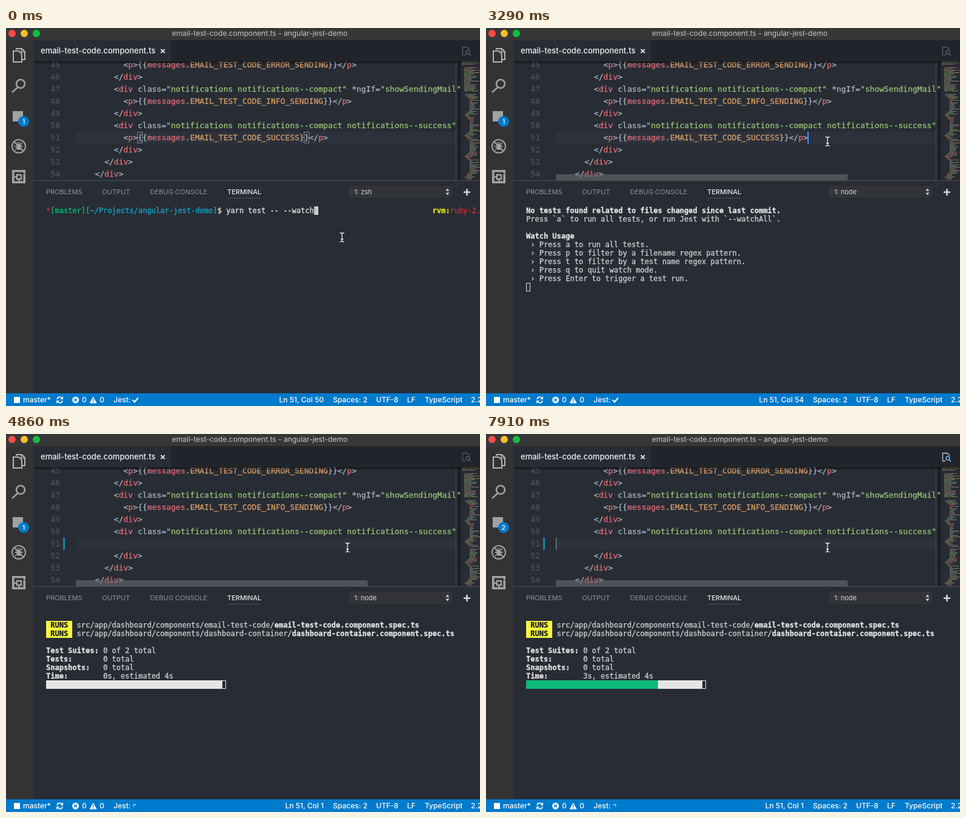
An HTML page with a canvas that plays this animation: 780x623 px, repeating every 7.99 s.

```html
<!DOCTYPE html>
<html>
<head>
<meta charset="utf-8">
<style>
html, body { margin: 0; width: 100%; height: 100%; overflow: hidden; background: #282c34; }
canvas { display: block; }
</style>
</head>
<body>
<canvas id="stage" width="780" height="623"></canvas>
<script>
const c = document.getElementById('stage').getContext('2d');
const LOOP = 7990;
const MONO = '"DejaVu Sans Mono", monospace', UI = 'Inter, Roboto, sans-serif';
const CODE_W = 13 * 0.60205, TERM_W = 12 * 0.60205;
const GREY = '#abb2bf', LIGHT = '#e5e5e5', BLUE = '#007acc';

const CODE = [
  [10, '<p>{{messages.EMAIL_TEST_CODE_ERROR_SENDING}}</p>'],
  [8, '</div>'],
  [8, '<div class="notifications notifications--compact" *ngIf="showSendingMail"'],
  [10, '<p>{{messages.EMAIL_TEST_CODE_INFO_SENDING}}</p>'],
  [8, '</div>'],
  [8, '<div class="notifications notifications--compact notifications--success"'],
  [10, '<p>{{messages.EMAIL_TEST_CODE_SUCCESS}}</p>'],
  [8, '</div>'],
  [6, '</div>'],
  [4, '</div>'],
];

// Moments of the story, in ms
const ENTER = 900, YARN = 1100, JEST = 1280, CLICK = 2150, SEARCH = 2330, USAGE = 2540,
  CUT = 3740, DIRTY = 3920, GUTTER = 4040, SAVE = 4220, RERUN = 4400, RUNS = 4660,
  STAGED = 5060, TICK = 5550;
const BLINKS = [CLICK, 2750, 3290, 4280, 5420, 5960, 6500, 7040, 7580];
const POINTER = [[0, 553, 345], [1280, 578, 314], [1370, 640, 240], [1450, 671, 194],
  [1540, 668, 168], [1630, 630, 171], [1710, 588, 181], [1800, 562, 187]];
// Braille dots as bits: left column 1, 2, 4, right column 8, 16, 32
const SPIN = [11, 25, 57, 56, 60, 52, 38, 39, 7, 15];

function rect(x, y, w, h, color) {
  c.fillStyle = color;
  c.fillRect(x, y, w, h);
}

function disc(x, y, r, color) {
  c.fillStyle = color;
  c.beginPath();
  c.arc(x, y, r, 0, 7);
  c.fill();
}

function path(d, color, width = 2) {
  c.strokeStyle = color;
  c.lineWidth = width;
  c.stroke(new Path2D(d));
}

function text(s, x, y, font, color, align = 'left') {
  c.font = font;
  c.textAlign = align;
  c.fillStyle = color;
  c.fillText(s, x, y);
}

// Monospaced text with a slightly heavier stem
function mono(s, x, y, font, color, align) {
  text(s, x, y, `${font} ${MONO}`, color, align);
  c.strokeStyle = color;
  c.lineWidth = 0.3;
  c.strokeText(s, x, y);
}

const ui = (s, x, y, size, color, align, weight = 400) =>
  text(s, x, y, `${weight} ${size}px ${UI}`, color, align);

const noise = n => {
  const v = Math.sin(n * 127.1 + 11.7) * 43758.5453;
  return v - Math.floor(v);
};

function badge(x, y, n) {
  disc(x, y, 9, BLUE);
  ui(n, x, y + 4, 11, '#fff', 'center', 500);
}

function titleBar(t) {
  rect(0, 0, 780, 20, '#373737');
  ['#fc4a47', '#fdbc2d', '#14bf3f'].forEach((color, i) => disc(10 + 20 * i, 9, 6, color));
  if (t >= DIRTY && t < SAVE) disc(10, 9, 2, '#7a0c08');
  ui('email-test-code.component.ts - angular-jest-demo', 417.5, 13, 12, '#c8c8c8', 'center');
}

function activityBar(t) {
  const icon = '#a2a2a2';
  rect(0, 20, 46, 582, '#333333');
  path('M17 36V34H26L31 39V52H27 M12 38H21L26 43V56H12Z', '#b4b4b4');
  path('M25.5 34V39.5H31', '#b4b4b4', 1.5);
  path('M31 92a7 7 0 1 1 -14 0a7 7 0 1 1 14 0 M19 98L10 106', icon, 2.6);
  rect(11, 137, 17, 17, icon);
  path('M32 195a11 11 0 1 1 -22 0a11 11 0 1 1 22 0 M13 187L29 203', icon, 2);
  path('M14 195H28 M15 201L18 198 M27 189L24 192 M18 188L20 190 M24 188L22 190 M16 190L18 192 M26 201L24 199', icon, 1.4);
  c.fillStyle = icon;
  c.beginPath();
  c.ellipse(21, 195.5, 3.8, 5.5, 0, 0, 7);
  c.fill();
  path('M11.8 235.8H30.2V254.2H11.8Z', icon, 3.6);
  path('M18 242H25V249H18Z M21.5 249V253 M13 245.5H17', icon, 2.4);
  path('M27 238V243 M22 240H31', '#333333', 1.4);
  if (t >= DIRTY && t < SAVE) badge(29, 54, '1');
  badge(29, 154, t < STAGED ? '1' : '2');
}

function tabs(t) {
  rect(46, 20, 734, 35, '#21252b');
  rect(46, 20, 226, 35, '#282c34');
  ui('email-test-code.component.ts', 57, 42, 13, '#f2f2f2', 'left', 500);
  if (t >= CUT && t < SAVE) disc(258, 38, 4.5, '#d8d8d8');
  else path('M254.8 34.8L261.2 41.2 M261.2 34.8L254.8 41.2', '#e4e4e4', 1.9);
  const color = t < STAGED ? '#545b65' : '#c3ccd6';
  path('M756 44.5H751.5V31.5H759L762.5 35V36', color, 1.3);
  path('M763 40a3 3 0 1 1 -6 0a3 3 0 1 1 6 0 M762 42.3L765 45.5', t < STAGED ? '#466078' : '#75b8e8', 1.6);
}

function tokens([indent, line], y) {
  for (const m of line.matchAll(/"[^"]*"|[A-Z_]{3,}|messages|div|p(?=>)|./g)) {
    const s = m[0];
    const color = s[0] === '"' ? '#98c379' : /^[A-Z_]{3}/.test(s) ? '#d19a66'
      : /^(messages|div|p)$/.test(s) ? '#e06c75' : GREY;
    mono(s, 115 + (indent + m.index) * CODE_W, y, '13px', color);
  }
}

function minimap(t) {
  const palette = ['#c25a64', '#b98a5c', '#86ab6c', '#8b929e', '#86ab6c'];
  c.globalAlpha = 0.85;
  for (let row = 0; row < 98; row++) {
    const y = 55 + row * 2, head = row < 25, step = (row - 27) % 17;
    if ([3, 4, 25, 26].includes(row) || (t >= CUT && row === 66)) continue;
    let x = head ? (row < 5 ? 750 : 754) : 755 + Math.min(step, 17 - step, 4) * 2;
    const end = head ? 764 + noise(row + 50) * 20 : x + 4 + noise(row + 90) * 16;
    for (let k = 0; x < Math.min(end, 780); k++) {
      const w = 2 + noise(row * 9 + k) * 5;
      rect(x, y, Math.min(w, end - x), 1, palette[Math.floor(noise(row * 7 + k * 3) * 5)]);
      x += w + 0.6;
    }
  }
  c.globalAlpha = 1;
}

function caretOn(t) {
  return BLINKS.filter(b => b <= t).length % 2 === 1;
}

function editor(t) {
  rect(46, 55, 734, 196, '#282c34');
  rect(115, 171, 625, 20, '#2c313c');
  rect(740, 55, 1, 196, '#4a4f58');
  const edge = c.createLinearGradient(741, 0, 750, 0);
  edge.addColorStop(0, '#282c34');
  edge.addColorStop(0.55, '#181b20');
  edge.addColorStop(1, '#282c34');
  rect(741, 55, 9, 196, edge);

  c.save();
  c.beginPath();
  c.rect(46, 55, 701, 196);
  c.clip();
  CODE.forEach((line, i) => {
    const y = 65 + 20 * i;
    mono(45 + i, 89, y, '13px', '#495162', 'right');
    c.textAlign = 'left';
    if (i !== 6 || t < CUT) tokens(line, y);
  });
  c.restore();

  if (t < CLICK) {
    c.strokeStyle = '#7f8590';
    c.lineWidth = 1;
    for (const col of [13, 48]) c.strokeRect(Math.round(115 + col * CODE_W) - 0.5, 171.5, 8, 18);
  }
  if (caretOn(t)) {
    if (t < CUT) rect(529, 171, 2, 20, '#528bff');
    else rect(115, 171, 1, 20, '#969ba5');
  }
  if (t >= GUTTER) rect(94, 171, 3, 20, '#1b81a8');

  c.globalAlpha = Math.max(0, Math.min(1, (t - 1430) / 200));
  rect(115, 241, 480, 10, 'rgba(105,107,111,0.6)');
  c.globalAlpha = 1;
  minimap(t);
  const shade = c.createLinearGradient(0, 55, 0, 60);
  shade.addColorStop(0, 'rgba(0,0,0,0.5)');
  shade.addColorStop(1, 'rgba(0,0,0,0)');
  rect(46, 55, 734, 5, shade);
}

function panel(t) {
  rect(46, 251, 734, 351, '#282c34');
  rect(46, 251, 734, 1, '#4b4f56');
  [['PROBLEMS', 66], ['OUTPUT', 158], ['DEBUG CONSOLE', 237], ['TERMINAL', 364]].forEach(([s, x], i) =>
    ui(s, x, 274, 11, i < 3 ? '#8f939a' : '#e7e7e7', 'left', i < 3 ? 400 : 500));
  rect(364, 280, 55, 1, '#4d525a');
  c.fillStyle = '#333438';
  c.beginPath();
  c.roundRect(564, 260, 170, 20, 4);
  c.fill();
  ui(t < ENTER ? '1: zsh' : '1: node', 573, 274, 11, '#d4d4d4');
  c.fillStyle = '#d4d4d4';
  c.fill(new Path2D('M723.5 268.5L726.5 264.5L729.5 268.5Z M723.5 271.5L726.5 275.5L729.5 271.5Z'));
  path('M753 270.5H764 M758.5 265V276', '#d8d8d8', 2.6);
}

function put(row, col, s, color = '#d0d0d0', bold = false) {
  mono(s, 66 + col * TERM_W, 305 + 14 * row, `${bold ? 'bold ' : ''}12px`, color, 'left');
}

const strong = (row, col, s, color = LIGHT) => put(row, col, s, color, true);

function block(row, col, hollow) {
  const x = Math.round(66 + col * TERM_W), y = 294 + 14 * row;
  if (!hollow) return rect(x, y, 7, 14, '#c8c8c8');
  c.strokeStyle = LIGHT;
  c.lineWidth = 1;
  c.strokeRect(x + 0.5, y + 0.5, 6, 13);
}

function shell(t) {
  put(0, 0, '*', '#cd3131');
  put(0, 1, '[master]', '#0dbc79');
  put(0, 9, '[~/Projects/angular-jest-demo]', '#11a8cd');
  put(0, 39, '$ yarn test -- --watch', LIGHT);
  strong(0, 88, 'rvm:', '#e5e510');
  put(0, 92, 'ruby-2.4', '#cd3131');
  if (t >= YARN) strong(1, 0, 'yarn test v0.21.3');
  if (t >= JEST) put(2, 0, '$ jest --watch');
  if (t < ENTER) block(0, 61);
  else block(t < YARN ? 1 : t < JEST ? 2 : 3, 0, t >= CLICK);
}

function usage() {
  strong(0, 0, 'No tests found related to files changed since last commit.');
  put(1, 0, 'Press `a` to run all tests, or run Jest with `--watchAll`.');
  strong(3, 0, 'Watch Usage');
  ['a to run all tests.', 'p to filter by a filename regex pattern.',
    't to filter by a test name regex pattern.', 'q to quit watch mode.',
    'Enter to trigger a test run.'].forEach((s, i) => put(4 + i, 1, '› Press ' + s));
  block(9, 0, true);
}

function running(t) {
  const seconds = t < TICK ? 0 : 1 + Math.floor((t - TICK) / 1000);
  rect(66, 308, 43, 28, '#f5f543');
  ['email-test-code', 'dashboard-container'].forEach((name, i) => {
    const dir = `src/app/dashboard/components/${name}/`;
    strong(1 + i, 1, 'RUNS', '#1c1c1c');
    put(1 + i, 7, dir);
    strong(1 + i, 7 + dir.length, name + '.component.spec.ts');
  });
  [['Test Suites:', '0 of 2 total'], ['Tests:', '0 total'], ['Snapshots:', '0 total'],
    ['Time:', seconds + 's, estimated 4s']].forEach(([label, value], i) => {
    strong(4 + i, 0, label);
    put(4 + i, 13, value);
  });
  rect(66, 406, 40 * TERM_W, 14, LIGHT);
  rect(66, 406, Math.round(10 * seconds * TERM_W), 14, '#0dbc79');
  block(8, 40, true);
}

function terminal(t) {
  if (t < SEARCH) shell(t);
  else if (t >= RUNS) running(t);
  else if (t < USAGE || t >= RERUN) {
    strong(0, 0, 'Determining test suites to run...');
    block(0, 33, true);
  } else usage();
}

function statusBar(t) {
  const label = (s, x, align) => ui(s, x, 617, 12, '#fff', align, 500);
  rect(0, 602, 780, 21, BLUE);
  rect(13, 608, 10, 10, '#fff');
  label('master*', 28);
  path('M84 612a4.5 4.5 0 0 1 8 -2 M93 614a4.5 4.5 0 0 1 -8 2', '#fff', 1.6);
  c.fillStyle = '#fff';
  c.fill(new Path2D('M94 607V612H89Z M83 619V614H88Z'));
  disc(114.5, 613, 5.5, '#fff');
  path('M112.3 610.8L116.7 615.2 M116.7 610.8L112.3 615.2', BLUE, 1.5);
  label('0', 125);
  c.fillStyle = '#fff';
  c.fill(new Path2D('M143.5 607.5L149.5 618.5H137.5Z'));
  path('M143.5 611V615 M143.5 616V617.4', BLUE, 1.4);
  label('0', 154);
  label('Jest:', 177);
  if (t < SAVE) {
    path('M208.5 613L211.5 616.5L217.5 609.5', '#fff', 2.2);
  } else {
    const bits = SPIN[Math.floor((t - 3841) / 98.5) % 10];
    for (let i = 0; i < 6; i++) {
      if (bits >> i & 1) rect(209.5 + 3 * Math.floor(i / 3), 610 + 2.6 * (i % 3), 1.6, 1.6, '#fff');
    }
  }
  label('Ln 51, Col ' + (t < CLICK ? 50 : t < CUT ? 54 : 1), 523, 'right');
  label('Spaces: 2', 538);
  label('UTF-8', 609);
  label('LF', 660);
  label('TypeScript', 689);
  label('2.2.2', 765);
}

function pointer(t) {
  const [, x, y] = POINTER.filter(p => p[0] <= t).pop();
  const shape = `M${x - 3.5} ${y - 7.5}Q${x} ${y - 7.5} ${x} ${y - 5}Q${x} ${y - 7.5} ${x + 3.5} ${y - 7.5}` +
    `M${x} ${y - 6}V${y + 6}M${x - 3.5} ${y + 7.5}Q${x} ${y + 7.5} ${x} ${y + 5}Q${x} ${y + 7.5} ${x + 3.5} ${y + 7.5}` +
    `M${x - 2} ${y + 3}H${x + 2}`;
  path(shape, 'rgba(0,0,0,0.3)', 2.4);
  path(shape, '#f4f4f4', 1.3);
}

function draw(now) {
  const t = now % LOOP;
  for (const part of [editor, tabs, titleBar, activityBar, panel, terminal, statusBar, pointer]) part(t);
  requestAnimationFrame(draw);
}

requestAnimationFrame(draw);
</script>
</body>
</html>
```
